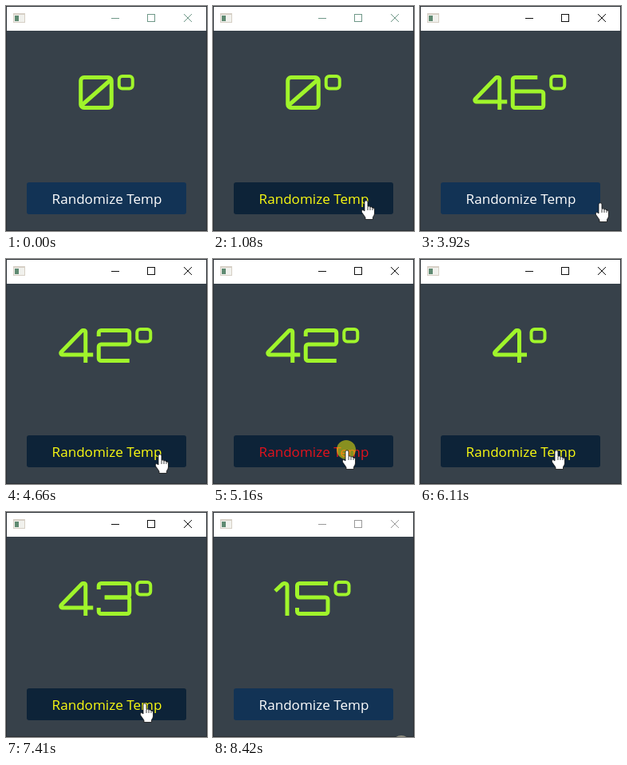
Recreate the animation shown at these times as an HTML page with a canvas. Size 252 by 282 pixels, loop 8.49 s.

```html
<!DOCTYPE html>
<html lang="en">
<head>
<meta charset="utf-8">
<title>Randomize Temp</title>
<style>
html, body { margin: 0; width: 100%; height: 100%; overflow: hidden; background: #37414a; }
canvas { display: block; width: 252px; height: 282px; }
</style>
</head>
<body>
<canvas id="stage" width="252" height="282"></canvas>
<script>
const ctx = document.getElementById('stage').getContext('2d');
const LOOP = 8490, HOLD = 150;
const ACTIVE_FROM = 1550, ACTIVE_TO = 8420;
const BUTTON = { x: 26, y: 221, w: 200, h: 40 };

// Each click shows its reading once the mouse is released
const clicks = [
  { at: 1550, reading: '23' }, { at: 2340, reading: '46' }, { at: 3080, reading: '46' },
  { at: 4190, reading: '42' }, { at: 5130, reading: '13' }, { at: 5700, reading: '4' },
  { at: 6190, reading: '26' }, { at: 6820, reading: '43' }, { at: 7560, reading: '15' }
];

// Swings of the pointer to the right and back to a new resting place
const trips = [
  { from: 3640, to: 4150, reach: 47, home: 170 },
  { from: 4600, to: 5080, reach: 61, home: 168 },
  { from: 5290, to: 6110, reach: 34, home: 171 },
  { from: 6580, to: 7400, reach: 38, home: 174 }
];

// Digits are strokes between named corners: A B top, C D middle, E F bottom, a e short hooks
const COLUMNS = { left: 5.5, right: 44 }, ROWS = { top: 2.5, middle: 20, bottom: 40.5 };
const HOOK = 7.5, DIGIT_ADVANCE = 49.5, DEGREE_ADVANCE = 26;
const { left, right } = COLUMNS, { top: high, middle, bottom } = ROWS;
const corners = {
  A: [left, high], B: [right, high], C: [left, middle], D: [right, middle],
  E: [left, bottom], F: [right, bottom],
  a: [left, high + HOOK], e: [left, bottom - HOOK], b: [right - HOOK, high], c: [left + HOOK, middle]
};
const strokes = { 2: ['aABDCEF'], 3: ['aABDc', 'cDFEe'], 5: ['BACDFEe'], 6: ['bAEFDC'] };

const hand = new Path2D('M-2 13V1.8A2 2 0 0 1 2 1.8V7.5Q4 6 5.3 8Q7 7 8 9' +
  'Q10.5 8.5 10.5 11V16Q10.5 18 8.5 20.5V23.5H-1V21L-5.5 14.5Q-6.5 11.5-4 11.5Z');

function ease(u) {
  u = Math.min(1, Math.max(0, u));
  return u * u * (3 - 2 * u);
}

function pointerAt(t) {
  const enter = 1 - ease((t - 640) / 440), leave = ease((t - 7850) / 290);
  let x = 192, y = 244 - 4 * ease((t - 4600) / 480);
  for (const { from, to, reach, home } of trips) {
    const u = (t - from) / (to - from);
    const swing = reach * ease(u / 0.3) * ease((1 - u) / 0.3);
    x += (home - x) * ease(u) + swing;
    y += 0.06 * swing;
    if (u < 1) break;
  }
  return {
    x: Math.round(x + 22 * enter + 53 * leave),
    y: Math.round(y + 40 * enter + 44 * leave)
  };
}

function readingAt(t) {
  return clicks.reduce((shown, { at, reading }) => t >= at + HOLD ? reading : shown, '0');
}

function fillRect(color, x, y, w, h) {
  ctx.fillStyle = color;
  ctx.fillRect(x, y, w, h);
}

function strokeRound(x, y, w, h, r) {
  ctx.beginPath();
  ctx.roundRect(x, y, w, h, r);
  ctx.stroke();
}

function strokeLine(points, radius = 0) {
  ctx.beginPath();
  ctx.moveTo(...points[0]);
  for (let i = 1; i < points.length - 1; i++) ctx.arcTo(...points[i], ...points[i + 1], radius);
  ctx.lineTo(...points[points.length - 1]);
  ctx.stroke();
}

function advanceOf(digit) {
  return digit === '1' ? 23.5 : digit === '4' ? 45 : DIGIT_ADVANCE;
}

function drawDigit(digit) {
  if (digit === '0') {
    strokeRound(left, high, right - left, bottom - high, 4);
    strokeLine([[left + 1, bottom - 3], [right - 1, high + 3]]);
  } else if (digit === '1') {
    strokeLine([[1.5, 12], [11.5, high], [16.5, high], [16.5, 43]], 3);
  } else if (digit === '4') {
    strokeLine([[43.5, 33], [3, 33], [3, 30], [30, high], [34, high], [34, 43]], 2);
  } else {
    for (const path of strokes[digit]) strokeLine([...path].map(key => corners[key]), 3);
  }
}

function drawReading(text) {
  const width = [...text].reduce((sum, d) => sum + advanceOf(d), DEGREE_ADVANCE);
  ctx.save();
  ctx.translate(126 - width / 2, 87);
  ctx.strokeStyle = '#a0f52b';
  ctx.lineWidth = 5;
  for (const digit of text) {
    drawDigit(digit);
    ctx.translate(advanceOf(digit), 0);
  }
  ctx.lineWidth = 4;
  strokeRound(4, 1, 17, 15.5, 4);
  ctx.restore();
}

function drawWindow(t, active) {
  fillRect('#37414a', 0, 0, 252, 282);
  fillRect('#fff', 1, 1, 250, 30);
  ctx.lineWidth = 1;
  ctx.strokeStyle = '#2b3035';
  ctx.strokeRect(0.5, 0.5, 251, 281);

  fillRect('#d6cfc5', 9, 9, 15, 12);
  fillRect('#f1f1ed', 10, 11, 13, 9);
  fillRect('#5f8a72', 11, 12, 5, 7);

  ctx.strokeStyle = active ? '#111' : t < ACTIVE_FROM ? '#6f9888' : '#999';
  strokeLine([[132, 15.5], [142, 15.5]]);
  ctx.strokeRect(177.5, 10.5, 9, 9);
  strokeLine([[223, 10], [233, 20]]);
  strokeLine([[233, 10], [223, 20]]);
}

function drawButton(hover, pressed) {
  ctx.fillStyle = hover ? '#0d2338' : '#123355';
  ctx.beginPath();
  ctx.roundRect(BUTTON.x, BUTTON.y, BUTTON.w, BUTTON.h, 3);
  ctx.fill();
  ctx.font = '17.1px "Open Sans", "Noto Sans", sans-serif';
  ctx.textAlign = 'center';
  ctx.fillStyle = pressed ? '#e3131d' : hover ? '#fbfb12' : '#fff';
  ctx.fillText('Randomize Temp', 126.5, 248);
}

function drawSpot(x, y, color) {
  ctx.fillStyle = color;
  ctx.beginPath();
  ctx.arc(x, y, 12, 0, Math.PI * 2);
  ctx.fill();
}

function drawHand({ x, y }) {
  ctx.save();
  ctx.translate(x, y);
  ctx.fillStyle = '#fff';
  ctx.fill(hand);
  ctx.strokeStyle = '#111';
  ctx.lineWidth = 0.8;
  ctx.stroke(hand);
  for (const knuckle of [2, 5, 8]) strokeLine([[knuckle, 8], [knuckle, 12]]);
  ctx.restore();
}

function draw(t) {
  const pointer = pointerAt(t);
  const pressed = clicks.some(({ at }) => t >= at && t < at + HOLD);
  const hover = pointer.x >= BUTTON.x && pointer.x < BUTTON.x + BUTTON.w &&
    pointer.y >= BUTTON.y && pointer.y < BUTTON.y + BUTTON.h;
  drawWindow(t, t >= ACTIVE_FROM && t < ACTIVE_TO);
  drawReading(readingAt(t));
  drawButton(hover, pressed);
  if (pressed) drawSpot(pointer.x - 1, pointer.y - 1, 'rgba(255, 250, 10, 0.51)');
  if (t >= ACTIVE_TO) drawSpot(236, 292, 'rgba(190, 184, 160, 0.65)');
  if (t > 640 && t < 8140) drawHand(pointer);
}

let start;
function frame(now) {
  start ??= now;
  draw((now - start) % LOOP);
  requestAnimationFrame(frame);
}
draw(0);
requestAnimationFrame(frame);
</script>
</body>
</html>
```
